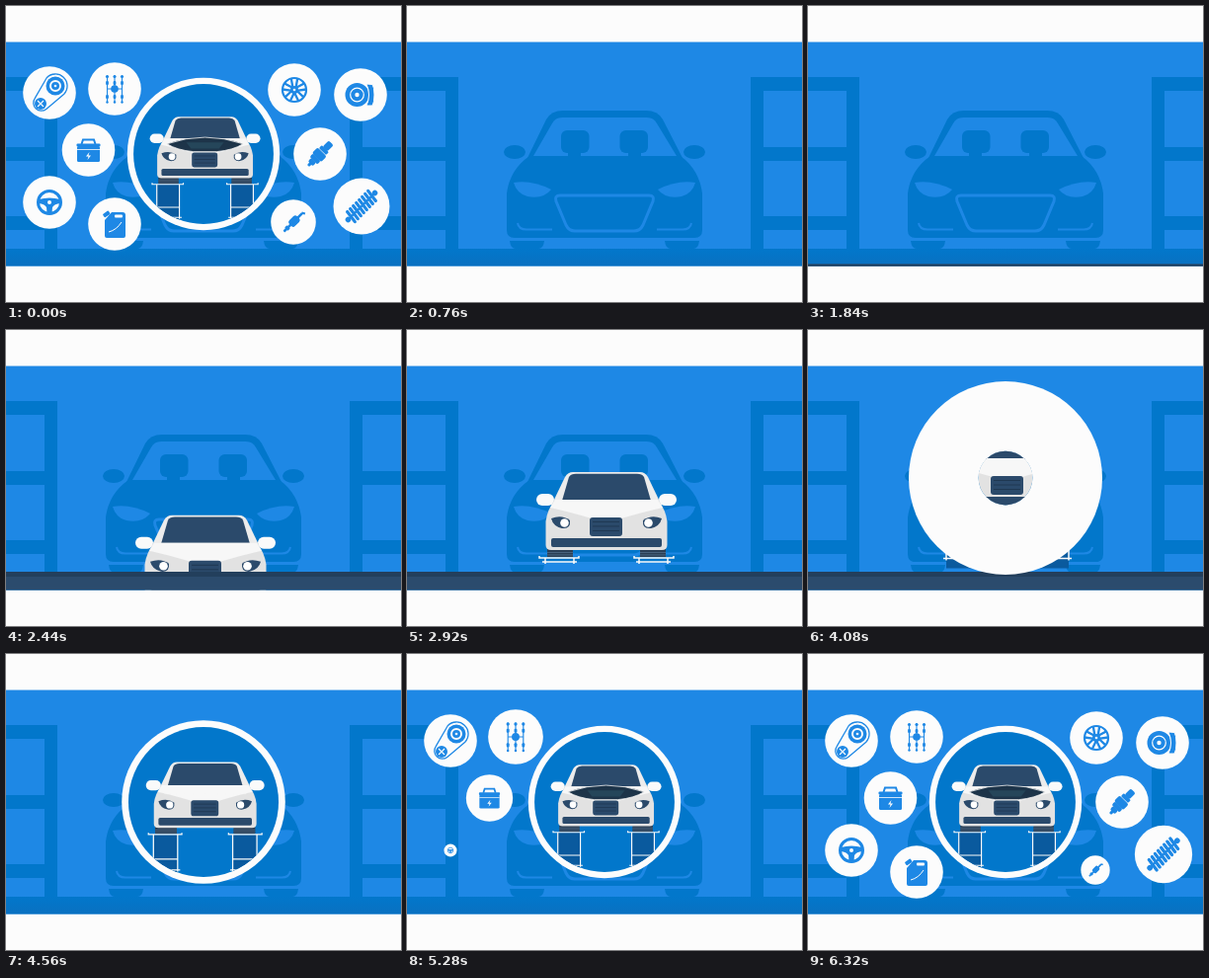
An HTML page for the animation above (6.36 s loop, 400 by 300 pixels).

```html
<!DOCTYPE html>
<html lang="en">
<head>
<meta charset="utf-8">
<title>Car service</title>
<style>
html, body { margin: 0; width: 100%; height: 100%; overflow: hidden; background: #fcfcfc; }
svg { display: block; width: 100vw; height: 100vh; }
</style>
</head>
<body>
<svg viewBox="0 0 400 300">
  <defs>
    <clipPath id="stage"><rect y="36.400" width="400" height="227.200"/></clipPath>
    <clipPath id="hole"><circle id="holeClip" cx="200" cy="150" r="0"/></clipPath>
    <linearGradient id="ground" x2="0" y2="1">
      <stop stop-color="#0277cb"/><stop offset="1" stop-color="#0a70c0"/>
    </linearGradient>
    <g id="shelf" fill="#0277cb">
      <path d="M0 72H52V246H39V227H0V213H39V157H0V143H39V86H0Z"/>
    </g>
    <g id="ghostSide">
      <ellipse cx="109" cy="148" rx="11" ry="7"/>
      <path d="M104 238H139Q138 246 133 246H110Q105 246 104 238Z"/>
      <rect x="156" y="126" width="28.500" height="23" rx="6"/>
      <rect x="163" y="147" width="13" height="8"/>
      <path fill="#1e88e5" d="M108 179Q126 176 146 186Q138 196 122 193Q111 190 108 179Z"/>
      <path fill="none" stroke="#1e88e5" stroke-width="2" d="M112 220Q113 226.500 121 226.500H147"/>
    </g>
    <g id="carSide">
      <rect x="131" y="22" width="18" height="12" rx="6" fill="#fafafa"/>
      <path fill="#2b3f55" d="M142 77H168V86H142Z"/>
      <path stroke="#4a6580" d="M142 81.500H168M142 84H168"/>
    </g>
    <g id="lamp">
      <path fill="#2b4a6b" d="M146 47Q157 43 165 49Q166 58 157 57Q148 55 146 47Z"/>
      <circle cx="159.500" cy="51.500" r="4.300" fill="#fff"/>
    </g>
  </defs>

  <g clip-path="url(#stage)">
    <rect y="36" width="400" height="229" fill="#1e88e5"/>
    <use href="#shelf"/>
    <use href="#shelf" transform="matrix(-1 0 0 1 400 0)"/>
    <rect y="246" width="400" height="19" fill="url(#ground)"/>
    <g fill="#0277cb">
      <path d="M122 154L141 115Q146 106 158 106H242Q254 106 259 115L279 154Z"/>
      <path fill="#1e88e5" d="M128 152L147 119Q150 113 157 113H243Q250 113 253 119L273 152Z"/>
      <path d="M124 152H277Q296 166 299 190V227Q299 235 291 235H109Q101 235 101 227V190Q104 166 124 152Z"/>
      <use href="#ghostSide"/>
      <use href="#ghostSide" transform="matrix(-1 0 0 1 400 0)"/>
      <path fill="none" stroke="#1e88e5" stroke-width="3" d="M155 192H245Q251 192 249 198L239 222Q236 228 230 228H170Q164 228 161 222L151 198Q149 192 155 192Z"/>
    </g>

    <g id="outside">
      <g id="lift">
        <path id="columns" fill="#0a5a9e"/>
        <path id="frame" fill="none" stroke="#fafafa" stroke-width="1.500"/>
        <g id="car">
          <use href="#carSide"/>
          <use href="#carSide" transform="matrix(-1 0 0 1 404 0)"/>
          <path fill="#ececec" d="M147 32L160 5Q163 0 168 0H236Q241 0 244 5L257 32Z"/>
          <path fill="#2b4a6b" d="M157 29L164 5Q166 1.800 171 1.800H233Q238 1.800 240 5L247 29Z"/>
          <path fill="#e2e2e2" d="M150 28H254Q262 38 263.500 50V74Q263.500 79 258 79H146Q140.500 79 140.500 74V50Q142 38 150 28Z"/>
          <path fill="#f7f7f7" d="M150 28H254L259 36Q241 40 217 47H187Q163 40 145 36Z"/>
          <g id="bay">
            <path fill="#1d3449" stroke="#f4f4f4" d="M153 35Q202 18 251 35Q238 43 217 45H187Q166 43 153 35Z"/>
            <path fill="#25465a" d="M178 33H226L220 41H184Z"/>
          </g>
          <use href="#lamp"/>
          <use href="#lamp" transform="matrix(-1 0 0 1 404 0)"/>
          <rect x="185" y="46" width="33" height="19" rx="3" fill="#2b4a6b"/>
          <path stroke="#1f3852" d="M188 50.500H215M188 55H215M188 59.500H215"/>
          <rect x="146" y="67" width="112" height="9" rx="2" fill="#2b4a6b"/>
        </g>
      </g>
    </g>

    <g id="floor">
      <rect y="245" width="400" height="25" fill="#2b4b6d"/>
      <rect y="245" width="400" height="5" fill="#233f5c"/>
    </g>
    <g id="ring">
      <circle id="disc" cx="200" cy="150" fill="#fcfcfc"/>
      <g clip-path="url(#hole)">
        <circle cx="200" cy="150" r="92" fill="#0277cb"/>
        <use href="#lift"/>
      </g>
    </g>
    <g id="icons"></g>
  </g>
</svg>
<script>
const LOOP = 6360;
const BLUE = '#1e88e5', WHITE = '#fcfcfc';
const $ = id => document.getElementById(id);
const range = (n, f) => Array.from({ length: n }, (_, i) => f(i)).join('');
const dot = (x, y, r, fill = BLUE) => `<circle cx="${x}" cy="${y}" r="${r}" fill="${fill}"/>`;
const hoop = (x, y, r, w, color = BLUE) => `<circle cx="${x}" cy="${y}" r="${r}" fill="none" stroke="${color}" stroke-width="${w}"/>`;
const bar = (x, y, w, h, rx = 1) => `<rect x="${x}" y="${y}" width="${w}" height="${h}" rx="${rx}"/>`;
const line = (d, w, color = BLUE) => `<path d="${d}" fill="none" stroke="${color}" stroke-width="${w}"/>`;
const turn = (a, s) => `<g transform="rotate(${a})">${s}</g>`;

const belt = line('M-2.800 -15.200A12 12 0 1 1 14.800 1.200L-3.200 16.400A8 8 0 0 1 -14.800 5.600Z', 1.300) +
  dot(6, -7, 9.500) + hoop(6, -7, 5, 2, WHITE) + dot(6, -7, 1.300, WHITE) +
  dot(-9, 11, 6) + line('M-12 8L-6 14M-12 14L-6 8', 1.100, WHITE);
const shifter = [-7.500, 0, 7.500].map(x => line(`M${x} -14V14`, 1.100) + dot(x, -12.500, 1.600) +
  bar(x - 1.400, -8, 2.800, 4) + bar(x - 1.400, 6, 2.800, 4) + dot(x, 13.500, 1.200)).join('') +
  line('M-7.500 0H7.500', 1.200) + dot(0, 0, 3.800);
const battery = bar(-11.500, -4, 23, 16, 1.500) + bar(-12, -6.500, 24, 3) +
  line('M-7 -6L-5.500 -10.500H5.500L7 -6', 2) + line('M-11.500 -0.500H11.500', 0.800, WHITE) +
  `<path fill="${WHITE}" d="M1 2L-2.500 6.500H0L-1 10L2.500 5.500H0Z"/>`;
const steering = hoop(0, 0, 11.500, 3) +
  '<path d="M-11 -3Q0 -6 11 -3V1Q5 1.500 3 5L2.500 11H-2.500L-3 5Q-5 1.500 -11 1Z"/>' + dot(0, 0, 2, WHITE);
const canister = '<path d="M-10 -4L-3 -12H8Q11 -12 11 -9V12Q11 14 9 14H-8Q-10 14 -10 12Z"/>' +
  turn(-35, bar(-4.500, -15, 7, 4)) + bar(0, -9.500, 8, 3).replace('/>', ` fill="${WHITE}"/>`) +
  line('M-6 8Q2 6 7 -2', 1, WHITE);
const rim = hoop(0, 0, 12, 2.200) +
  range(5, i => turn(i * 72, line('M-1.500 -2L-3.200 -11.500M1.500 -2L3.200 -11.500', 2.300))) +
  dot(0, 0, 4) + dot(0, 0, 1.300, WHITE);
const brake = dot(-3.500, 0, 12) + hoop(-3.500, 0, 6.800, 1.200, WHITE) + dot(-3.500, 0, 2.200, WHITE) +
  `<path stroke="${WHITE}" d="M6 -11L12 -10.500Q14 -8 14 0T12 11L6 11Q11 0 6 -11Z"/>`;
const plug = turn(-45, bar(-17, -1.500, 4, 3) + bar(-14, -3.500, 5, 7, 2) + bar(-9.500, -5.500, 5, 11, 2) +
  bar(-5, -6.500, 8, 13, 2) + bar(3.500, -5, 4, 10) + bar(7, -3.500, 9, 7, 2));
const spring = turn(-45, bar(-17, -1, 34, 2) + dot(-18, 0, 2.600) + dot(18, 0, 2.600) +
  range(8, i => `<g transform="translate(${i * 4 - 14} 0) rotate(8)">${bar(-1.500, -7.500, 3, 15, 1.500)}</g>`));
const muffler = turn(-45, bar(-16, -1.500, 31, 3) + bar(-5, -4.800, 13, 9.600, 3) + bar(-12, -2.800, 4, 5.600)) +
  line('M10 -11L14 -10', 2.500);

const ICONS = [
  [44, 88, belt], [110, 84, shifter], [83.500, 146, battery], [44, 199, steering], [110, 221, canister],
  [292, 85, rim], [359, 90, brake], [318, 150, plug], [360, 203, spring], [291, 219, muffler]
];
$('icons').innerHTML = ICONS.map(([, , art]) => `<g fill="${BLUE}">${dot(0, 0, 26.800, WHITE)}${art}</g>`).join('');
const iconNodes = [...$('icons').children];

// Piecewise linear value through [time, value] points.
function track(t, ...points) {
  if (t <= points[0][0]) return points[0][1];
  for (let i = 1; i < points.length; i++) {
    const [t0, a] = points[i - 1], [t1, b] = points[i];
    if (t <= t1) return a + (b - a) * (t - t0) / (t1 - t0);
  }
  return points[points.length - 1][1];
}
const ease = (t, t0, t1) => {
  const p = track(t, [t0, 0], [t1, 1]);
  return p * p * (3 - 2 * p);
};
const pop = age => track(age, [0, 0], [60, 0.240], [140, 0.540], [180, 0.850], [220, 0.880], [280, 1.100], [380, 1.040], [460, 1]);
const scaleAt = (x, y, s) => `translate(${x} ${y}) scale(${s})`;
const show = (node, on) => node.setAttribute('display', on ? 'inline' : 'none');

function drawLift(top) {
  const arm = top + 87, base = Math.max(231.500, arm + 4);
  const extended = base - arm > 28;
  // Each column: centre, left post, right post.
  const columns = [[154, 140, 169], [250, 235, 264]];
  $('columns').setAttribute('d', columns.map(([, a, b]) =>
    extended ? `M${a} ${arm}H${b}V${base + 10}H${a}Z` : '').join(''));
  $('frame').setAttribute('d', columns.map(([x, a, b]) =>
    `M${x - 20} ${arm - 2}V${arm}H${x + 20}V${arm - 2}M${a} ${arm}V${base + 2}M${b} ${arm}V${base + 2}` +
    `M${a - 3} ${base}H${b + 3}` + (extended ? `M${a} ${base - 13}H${b}` : '')).join(''));
}

function draw(ms) {
  // The closing part of the cycle runs past the loop point.
  const t = ms < 1000 ? ms + LOOP : ms;

  const floorY = 19 * (1 - ease(t, 1780, 2060) + ease(t, 4100, 4300));
  $('floor').setAttribute('transform', `translate(0 ${floorY})`);

  const top = track(t, [2160, 247], [2400, 197], [2440, 188], [2560, 166], [2740, 150],
    [3040, 140], [3400, 126], [3680, 111], [3900, 103], [4000, 102]);
  $('car').setAttribute('transform', `translate(0 ${top})`);
  drawLift(top);
  const open = ease(t, 4560, 4840);
  $('bay').setAttribute('transform', `translate(0 ${38 * (1 - open)}) scale(1 ${open})`);
  show($('bay'), open > 0);
  $('outside').setAttribute('visibility', t > 2100 && t < 4180 ? 'visible' : 'hidden');
  $('lift').setAttribute('visibility', 'inherit');

  const ringScale = t < 6500
    ? 1 - 0.212 * ease(t, 4330, 4680)
    : track(t, [6800, 0.788], [6880, 0.810], [6940, 0.740], [7000, 0.580], [7040, 0.360], [7080, 0.130], [7110, 0]);
  $('ring').setAttribute('transform', scaleAt(200, 150, ringScale) + ' translate(-200 -150)');
  show($('ring'), t > 3780 && t < 7110);
  $('disc').setAttribute('r', track(t, [3780, 0], [3960, 109], [4080, 98]));
  $('holeClip').setAttribute('r', track(t, [4020, 0], [4080, 27], [4200, 72], [4300, 90]));

  const leave = track(t, [6720, 0], [6970, 1]);
  ICONS.forEach(([x, y], i) => {
    const size = pop(t - 4740 - i * 160) * (1 - leave * leave);
    iconNodes[i].setAttribute('transform', scaleAt(x, y, size));
    show(iconNodes[i], size > 0);
  });
}

const start = performance.now();
function tick() {
  draw((performance.now() - start) % LOOP);
  requestAnimationFrame(tick);
}
tick();
</script>
</body>
</html>
```
